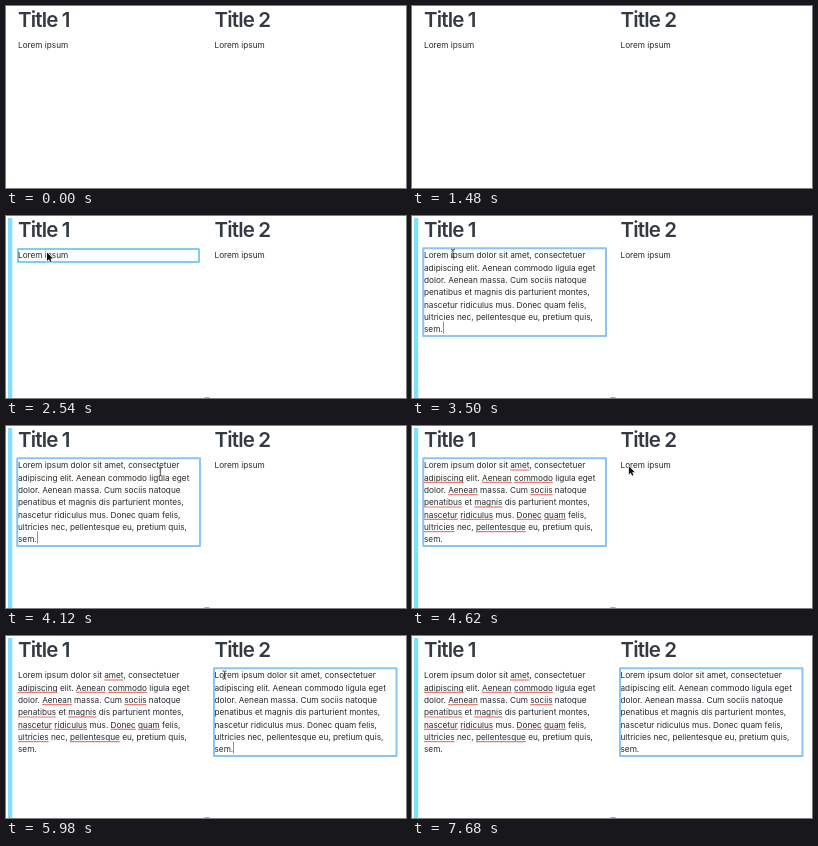
An HTML page with a canvas for the animation above (8000 ms loop, 400 by 182 pixels).

```html
<!DOCTYPE html>
<html lang="en">
<head>
<meta charset="utf-8">
<title>Inline text editing</title>
<style>
  html, body { margin: 0; width: 100%; height: 100%; overflow: hidden; background: #fff; }
  canvas { display: block; width: 400px; height: 182px; }
</style>
</head>
<body>
<canvas id="stage" width="400" height="182"></canvas>
<script>
const ctx = document.getElementById('stage').getContext('2d');
const LOOP = 8000;
const LINE = 12.33;
const BASE = 42.2;
const SANS = 'Inter, "Open Sans", sans-serif';
const CYAN = '#4fc0ee';
const FOCUS = '#8ac4f4';

const SHORT = ['Lorem ipsum'];
const LONG = [
  'Lorem ipsum dolor sit amet, consectetuer',
  'adipiscing elit. Aenean commodo ligula eget',
  'dolor. Aenean massa. Cum sociis natoque',
  'penatibus et magnis dis parturient montes,',
  'nascetur ridiculus mus. Donec quam felis,',
  'ultricies nec, pellentesque eu, pretium quis,',
  'sem.'
];
const MISSPELT = new Set(('amet adipiscing Aenean commodo sociis penatibus magnis ' +
  'nascetur ridiculus Donec quam ultricies pellentesque').split(' '));

const columns = [
  { x: 12, title: 'Title 1', box: [11.2, 194], focus: 2680, select: 2780, paste: 3500,
    blur: 4960, spell: 4400, caretOff: [[4140, 4680]] },
  { x: 208.5, title: 'Title 2', box: [208, 390.5], focus: 4960, select: 5040, paste: 5780,
    blur: Infinity, spell: Infinity, caretOff: [[6560, 7120], [7680, LOOP]] }
];

// time, x, y of the pointer's hot spot
const path = [
  [1480, 112, 184], [1620, 78, 92], [1860, 41, 32], [2060, 41, 36],
  [3960, 41, 38], [4120, 154, 46], [4300, 208, 46], [4680, 218.5, 39],
  [6120, 218.5, 39], [6540, 318, 64], [6600, 322, 65], [6900, 402, 84]
];

const ramp = (t, from, to) => Math.min(1, Math.max(0, (t - from) / (to - from)));
const within = (t, from, to) => t >= from && t < to;

function pointerAt(t) {
  for (let i = 1; i < path.length; i++) {
    const [t0, x0, y0] = path[i - 1], [t1, x1, y1] = path[i];
    if (within(t, t0, t1)) {
      const k = (t - t0) / (t1 - t0);
      return [x0 + (x1 - x0) * k, y0 + (y1 - y0) * k];
    }
  }
  return null;
}

function withAlpha(alpha, draw) {
  if (alpha <= 0) return;
  ctx.save();
  ctx.globalAlpha = alpha;
  draw();
  ctx.restore();
}

function bar(x) {
  const width = 4.5;
  ctx.save();
  ctx.beginPath();
  ctx.rect(x, 2, width, 180);
  ctx.clip();
  ctx.fillStyle = '#7cdcfb';
  ctx.fillRect(x, 2, width, 180);
  ctx.strokeStyle = 'rgba(255,255,255,.22)';
  ctx.lineWidth = 1;
  ctx.beginPath();
  for (let y = 0; y < 190; y += 4) {
    ctx.moveTo(x, y + width);
    ctx.lineTo(x + width, y);
  }
  ctx.stroke();
  ctx.restore();
}

function rowOutline() {
  bar(2);
  bar(198.5);
  ctx.fillStyle = '#4ccdf7';
  ctx.fillRect(5.5, 2, 1, 180);
  ctx.fillRect(199, 2, 1, 180);
  ctx.strokeStyle = '#a6e8fc';
  ctx.lineWidth = 1;
  ctx.setLineDash([4, 3]);
  ctx.beginPath();
  ctx.moveTo(3, 2);
  ctx.lineTo(397.5, 2);
  ctx.lineTo(397.5, 182);
  ctx.stroke();
}

function ring([left, right], top, rows, color, width) {
  ctx.strokeStyle = color;
  ctx.lineWidth = width;
  ctx.lineJoin = 'round';
  ctx.strokeRect(left, top, right - left, 33.7 - top + rows * LINE);
}

function outlines(col, index, rows, t) {
  if (index === 0 && t < col.focus) {
    withAlpha(ramp(t, 2320, 2520), () => ring([12, 193], 33, 1, CYAN, 1.5));
  }
  if (!within(t, col.focus, col.blur)) return;
  const settle = ramp(t, col.focus + 100, col.paste);
  withAlpha(ramp(t, col.focus - 60, col.focus + 100), () => ring(col.box, 32.2, rows, FOCUS, 2));
  withAlpha(1 - settle, () => ring(col.box, 32.2, rows, CYAN, 2.4));
}

function underline(line, x, y) {
  ctx.strokeStyle = '#e8796e';
  ctx.lineWidth = 1.2;
  for (const { 0: word, index } of line.matchAll(/\w+/g)) {
    if (!MISSPELT.has(word)) continue;
    const start = x + ctx.measureText(line.slice(0, index)).width;
    ctx.beginPath();
    ctx.moveTo(start, y);
    ctx.lineTo(start + ctx.measureText(word).width, y);
    ctx.stroke();
  }
}

function drawColumn(col, index, t) {
  const lines = t >= col.paste ? LONG : SHORT;
  ctx.font = `600 20.5px ${SANS}`;
  ctx.letterSpacing = '-0.85px';
  ctx.fillStyle = '#343a43';
  ctx.fillText(col.title, col.x, 21.4);

  outlines(col, index, lines.length, t);

  ctx.font = `400 8.22px ${SANS}`;
  ctx.letterSpacing = '0px';
  if (within(t, col.select, col.paste)) {
    ctx.fillStyle = '#b3d5fb';
    ctx.fillRect(col.x, 34, ctx.measureText(SHORT[0]).width, 11);
  }
  lines.forEach((line, i) => {
    const y = BASE + i * LINE;
    ctx.fillStyle = '#25292e';
    ctx.fillText(line, col.x, y);
    if (t >= col.spell) underline(line, col.x, y + 1.8);
  });

  const hidden = col.caretOff.some(([from, to]) => within(t, from, to));
  if (within(t, col.paste, col.blur) && !hidden) {
    const end = col.x + ctx.measureText(LONG[6]).width;
    ctx.fillStyle = '#777';
    ctx.fillRect(Math.round(end), 105.5, 0.8, 12);
  }
}

function arrow(x, y) {
  const shape = [[0, 0], [0, 8.4], [1.9, 6.7], [3.2, 9.6], [4.6, 9], [3.3, 6.2], [5.9, 6.1]];
  ctx.beginPath();
  shape.forEach(([dx, dy]) => ctx.lineTo(x + dx, y + dy));
  ctx.closePath();
  ctx.lineJoin = 'round';
  ctx.lineWidth = 1.2;
  ctx.strokeStyle = '#fff';
  ctx.stroke();
  ctx.fillStyle = '#111';
  ctx.fill();
}

function beam(x, y) {
  ctx.strokeStyle = '#333';
  ctx.lineWidth = 0.9;
  ctx.beginPath();
  for (const side of [-1.8, 1.8]) {
    ctx.moveTo(x + side, y - 4.2);
    ctx.quadraticCurveTo(x, y - 4.2, x, y - 2.8);
    ctx.moveTo(x + side, y + 4.2);
    ctx.quadraticCurveTo(x, y + 4.2, x, y + 2.8);
  }
  ctx.moveTo(x, y - 2.8);
  ctx.lineTo(x, y + 2.8);
  ctx.stroke();
}

function drawPointer(t) {
  const spot = pointerAt(t);
  if (!spot) return;
  const [x, y] = spot;
  const editing = within(t, 2900, 4960) && x < 194 || t >= 5200 && x < 391;
  (editing ? beam : arrow)(x, y);
}

function draw(t) {
  ctx.fillStyle = '#fff';
  ctx.fillRect(0, 0, 400, 182);
  withAlpha(ramp(t, 1560, 1700) * (1 - ramp(t, 2320, 2520)), rowOutline);
  withAlpha(ramp(t, 2320, 2400), () => {
    bar(2);
    ctx.fillStyle = '#aaa';
    ctx.fillRect(198.5, 181, 5, 1);
  });
  columns.forEach((col, i) => drawColumn(col, i, t));
  drawPointer(t);
}

const start = performance.now();
function tick() {
  draw((performance.now() - start) % LOOP);
  requestAnimationFrame(tick);
}
tick();
</script>
</body>
</html>
```
